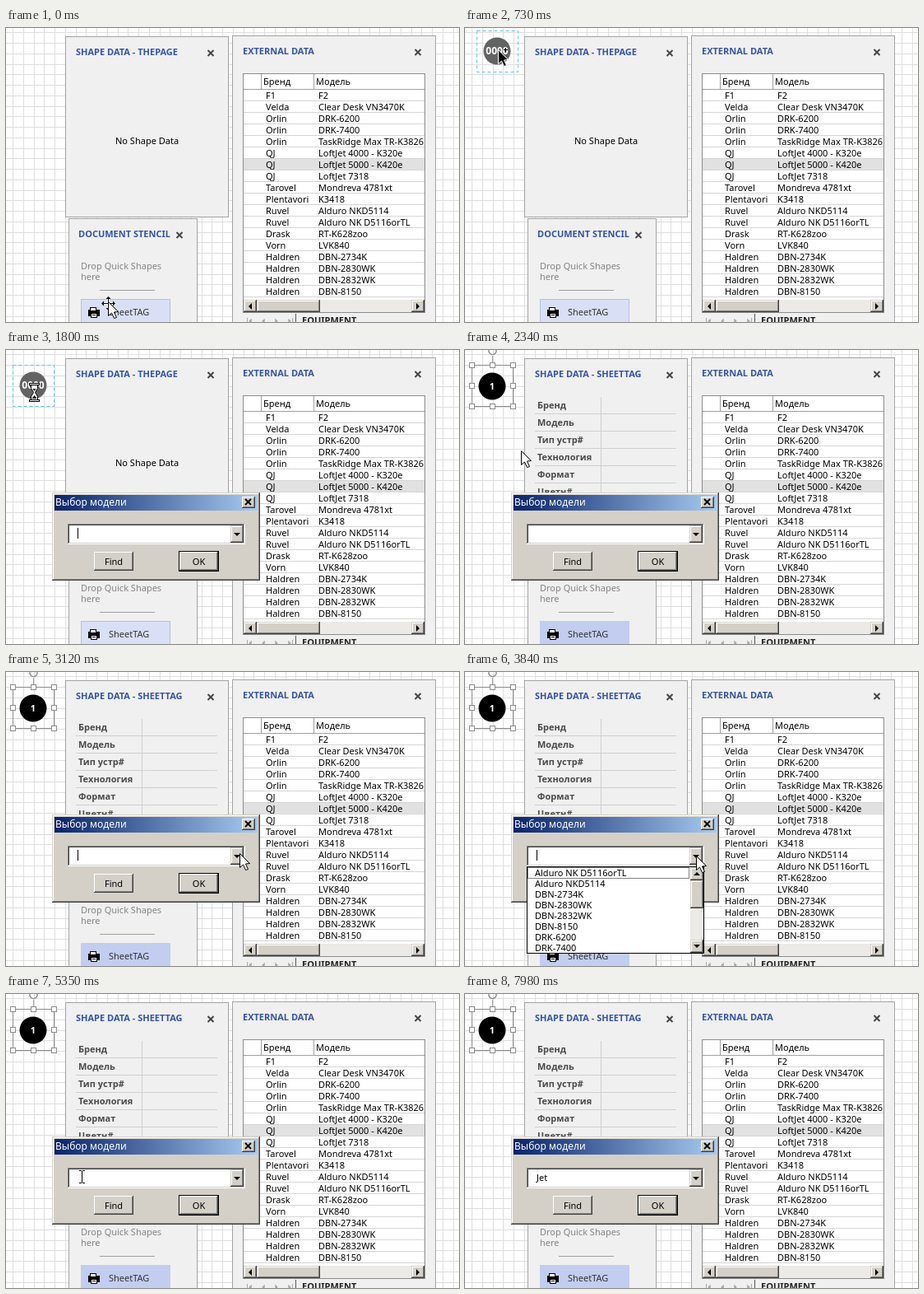
Recreate the animation shown at these times as an HTML page with a canvas. Size 551x357 px, loop 8000 ms.

```html
<!DOCTYPE html>
<html lang="ru">
<head>
<meta charset="utf-8">
<title>Выбор модели</title>
<style>
html, body { margin: 0; width: 100%; height: 100%; overflow: hidden; background: #fff; }
canvas { display: block; width: 551px; height: 357px; }
</style>
</head>
<body>
<canvas id="stage" width="551" height="357"></canvas>
<script>
const ctx = document.getElementById('stage').getContext('2d');
const LOOP = 8000;
const CELL = 12.75;
const FACE = '#d4d0c8';
const BLUE = '#3453a8';

const devices = [
  ['F1', 'F2'], ['Velda', 'Clear Desk VN3470K'], ['Orlin', 'DRK-6200'], ['Orlin', 'DRK-7400'],
  ['Orlin', 'TaskRidge Max TR-K3826'], ['QJ', 'LoftJet 4000 - K320e'], ['QJ', 'LoftJet 5000 - K420e'],
  ['QJ', 'LoftJet 7318'], ['Tarovel', 'Mondreva 4781xt'], ['Plentavori', 'K3418'],
  ['Ruvel', 'Alduro NKD5114'], ['Ruvel', 'Alduro NK D5116orTL'], ['Drask', 'RT-K628zoo'],
  ['Vorn', 'LVK840'], ['Haldren', 'DBN-2734K'], ['Haldren', 'DBN-2830WK'],
  ['Haldren', 'DBN-2832WK'], ['Haldren', 'DBN-8150']
];
const choices = [11, 10, 14, 15, 16, 17, 2, 3].map(i => devices[i][1]);
const fields = ['Бренд', 'Модель', 'Тип устр#', 'Технология', 'Формат', 'Цветн#'];

// [time, kind, x, y]
const pointer = [
  [0, 'move', 124, 334], [150, 'drag', 123, 332], [460, 'drag', 120, 272], [590, 'drag', 92, 128],
  [720, 'drag', 40, 26], [850, 'drag', 46, 26], [1130, 'drag', 40, 41], [1410, 'drag', 34, 41],
  [1800, 'wait', 34, 51], [2070, 'arrow', 40, 110], [2340, 'arrow', 68, 122], [2460, 'arrow', 122, 146],
  [2580, 'arrow', 180, 174], [2700, 'arrow', 232, 198], [2850, 'arrow', 268, 214], [2970, 'arrow', 284, 220],
  [3540, 'arrow', 283, 222], [3690, 'arrow', 281, 223], [3960, 'beam', 246, 222], [4080, 'beam', 174, 222],
  [4230, 'beam', 104, 222], [4380, 'arrow', 67, 222], [4650, 'arrow', 70, 221], [4790, 'beam', 84, 222],
  [4920, 'beam', 92, 222], [6440, 'none', 0, 0]
];
// [time, text, caret visible]
const edits = [
  [1800, '', 1], [2340, '', 0], [2850, '', 1], [3390, '', 0], [3840, '', 1], [5350, '', 0], [5820, '', 1],
  [6440, 'J', 1], [6830, 'J', 0], [7390, 'Je', 1], [7550, 'Jet', 1], [7980, 'Jet', 0]
];

const at = (keys, t) => keys.filter(k => k[0] <= t).pop();

function rect(x, y, w, h, fill) {
  ctx.fillStyle = fill;
  ctx.fillRect(x, y, w, h);
}

function frame(x, y, w, h, color) {
  ctx.strokeStyle = color;
  ctx.lineWidth = 1;
  ctx.strokeRect(x + .5, y + .5, w - 1, h - 1);
}

function text(s, x, mid, color = '#000', weight = 400, size = 11, align = 'left') {
  ctx.font = `${weight} ${size}px "Noto Sans", "Open Sans", sans-serif`;
  ctx.textAlign = align;
  ctx.fillStyle = color;
  ctx.fillText(s, x, mid + 4);
}

function poly(points, fill, stroke) {
  ctx.beginPath();
  points.forEach(([x, y]) => ctx.lineTo(x, y));
  ctx.closePath();
  if (fill) { ctx.fillStyle = fill; ctx.fill(); }
  if (stroke) { ctx.strokeStyle = stroke; ctx.lineWidth = 1; ctx.stroke(); }
}

function disc(x, y, r, fill) {
  ctx.beginPath();
  ctx.arc(x, y, r, 0, 7);
  ctx.fillStyle = fill;
  ctx.fill();
}

function cross(x, y, r, color, width) {
  ctx.beginPath();
  ctx.moveTo(x - r, y - r); ctx.lineTo(x + r, y + r);
  ctx.moveTo(x + r, y - r); ctx.lineTo(x - r, y + r);
  ctx.strokeStyle = color;
  ctx.lineWidth = width;
  ctx.stroke();
}

// Triangle pointing along angle a
function arrowHead(x, y, r, a, color) {
  const c = Math.cos(a), s = Math.sin(a);
  poly([[r / 2, 0], [-r / 2, -r], [-r / 2, r]].map(([u, v]) => [x + u * c - v * s, y + u * s + v * c]), color);
}

// Buttons have the white edge outside, windows and scroll bars inside
function raised(x, y, w, h, outer = FACE, inner = '#fff') {
  rect(x, y, w, h, '#404040');
  rect(x, y, w - 1, h - 1, outer);
  rect(x + 1, y + 1, w - 2, h - 2, '#808080');
  rect(x + 1, y + 1, w - 3, h - 3, inner);
  rect(x + 2, y + 2, w - 4, h - 4, FACE);
}

function scrollButton(x, y, w, h, angle) {
  raised(x, y, w, h);
  if (angle !== undefined) arrowHead(x + 8, y + 8, 4, angle, '#000');
}

function grid() {
  rect(0, 0, 551, 357, '#fff');
  for (let x = 8; x < 551; x += CELL) rect(Math.round(x), 0, 1, 357, '#dedede');
  for (let y = 18 - CELL; y < 357; y += CELL) rect(0, Math.round(y), 551, 1, '#dedede');
}

function panel(x, y, w, h, title, tx, ty, cx) {
  rect(x, y, w, h, '#f0f0f0');
  frame(x, y, w, h, '#a3a3a3');
  text(title, tx, ty, BLUE, 700);
  cross(cx, ty + 1.5, 3.5, '#444', 2);
}

function shapeData(linked) {
  panel(72, 10, 199, 220, 'SHAPE DATA - ' + (linked ? 'SHEETTAG' : 'THEPAGE'), 85, 29, 249);
  if (!linked) return text('No Shape Data', 133, 137);
  rect(165, 57, 1, 120, '#cfcfcf');
  fields.forEach((name, i) => {
    text(name, 88, 67 + 21 * i, '#4a4a4a', 600);
    rect(85, 77 + 21 * i, 172, 1, '#cfcfcf');
  });
}

function stencil(linked) {
  panel(76, 231, 157, 130, 'DOCUMENT STENCIL', 88, 250, 211);
  text('Drop Quick Shapes', 91, 289, '#858585');
  text('here', 91, 302, '#858585');
  rect(114, 318, 67, 1, '#a0a0a0');
  rect(91, 329, 109, 40, linked ? '#c2cdf0' : '#d9e0f5');
  if (!linked) frame(91, 329, 109, 40, '#b4c1e2');
  rect(100, 342, 14, 8, '#000');
  rect(102, 339, 8, 5, '#000');
  rect(103, 340, 6, 3, '#fff');
  rect(103, 346, 8, 6, '#000');
  rect(104, 347, 6, 4, '#fff');
  rect(105, 348, 4, 1, '#000');
  text('SheetTAG', 125, 345, '#333');
}

function externalData() {
  panel(275, 9, 248, 360, 'EXTERNAL DATA', 288, 28, 501);
  rect(288, 55, 222, 291, '#fff');
  ctx.save();
  ctx.beginPath();
  ctx.rect(288, 55, 221, 275);
  ctx.clip();
  rect(288, 159, 222, 14, '#e1e1e1');
  text('Бренд', 313, 65);
  text('Модель', 377, 65);
  rect(288, 74, 222, 1, '#a0a0a0');
  for (const x of [310, 374]) rect(x, 56, 1, 18, '#a0a0a0');
  devices.forEach(([brand, model], i) => {
    rect(288, 88 + 14 * i, 222, 1, '#d6d6d6');
    text(brand, 316, 82 + 14 * i);
    text(model, 380, 82 + 14 * i);
  });
  ctx.restore();
  frame(288, 55, 222, 291, '#8c8c8c');
  rect(289, 330, 220, 15, '#eceae6');
  scrollButton(289, 330, 16, 15, Math.PI);
  scrollButton(305, 330, 77, 15);
  scrollButton(493, 330, 16, 15, 0);
  for (let i = 0; i < 4; i++) {
    const x = 297 + 16 * i;
    arrowHead(x, 356, 3.5, i < 2 ? Math.PI : 0, '#a8a8a8');
    if (i % 3 === 0) rect(i ? x + 3 : x - 4, 352, 1, 7, '#a8a8a8');
  }
  rect(352, 347, 1, 10, '#555');
  text('EQUIPMENT', 360, 355, '#222', 700);
}

function ghost(x, y) {
  ctx.setLineDash([4, 3]);
  frame(x, y, 51, 51, '#5fc6ea');
  ctx.setLineDash([]);
  disc(x + 25, y + 25, 16.5, '#636363');
  text('0000', x + 25, y + 25, '#fff', 700, 12, 'center');
}

function placedShape() {
  ctx.beginPath();
  ctx.moveTo(33.5, 7); ctx.lineTo(33.5, 18);
  ctx.strokeStyle = '#a0a0a0';
  ctx.lineWidth = 1;
  ctx.stroke();
  frame(8, 18, 51, 51, '#8c8c8c');
  disc(33, 44, 16.5, '#000');
  text('1', 33, 44, '#fff', 700, 11, 'center');
  for (const x of [8, 33, 58]) for (const y of [18, 43, 68]) {
    if (x === 33 && y === 43) continue;
    rect(x - 3, y - 3, 7, 7, '#fff');
    frame(x - 3, y - 3, 7, 7, '#8c8c8c');
  }
  ctx.beginPath();
  ctx.arc(33.5, 1, 4.5, -.4, 4.6);
  ctx.strokeStyle = '#8c8c8c';
  ctx.lineWidth = 1.5;
  ctx.stroke();
}

function button(label, x, y, w, h, chosen) {
  if (chosen) rect(x - 1, y - 1, w + 2, h + 2, '#000');
  raised(x, y, w, h, '#fff', FACE);
  text(label, x + w / 2, y + h / 2, '#000', 400, 11, 'center');
}

function dialog(t) {
  raised(56, 173, 253, 107);
  const shade = ctx.createLinearGradient(60, 0, 305, 0);
  shade.addColorStop(0, '#0a246a');
  shade.addColorStop(1, '#a6caf0');
  rect(59, 176, 247, 19, shade);
  text('Выбор модели', 60, 185, '#fff', 400, 12);
  raised(287, 178, 16, 14, '#fff', FACE);
  cross(294.5, 184.5, 3.5, '#000', 2);

  rect(75, 211, 216, 25, '#fff');
  rect(75, 211, 215, 24, '#808080');
  rect(76, 212, 214, 23, FACE);
  rect(76, 212, 213, 22, '#404040');
  rect(77, 213, 212, 21, '#fff');
  raised(273, 213, 16, 21);
  arrowHead(281, 224, 4, Math.PI / 2, '#000');

  const [, typed, caret] = at(edits, t);
  text(typed, 87, 223);
  if (caret) rect(87 + [0, 5, 11, 15][typed.length], 216, 1, 13, '#000');

  button('Find', 107, 245, 48, 23);
  button('OK', 211, 245, 47, 23, true);
  if (t >= 3270 && t < 4530) dropdown();
}

function dropdown() {
  rect(75, 236, 216, 106, '#fff');
  ctx.setLineDash([1, 1]);
  frame(76, 237, 197, 14, '#000');
  ctx.setLineDash([]);
  choices.forEach((name, i) => text(name, 85, 244 + 13 * i));
  rect(274, 237, 16, 104, '#eceae6');
  scrollButton(274, 237, 16, 16, -Math.PI / 2);
  scrollButton(274, 253, 16, 34);
  scrollButton(274, 325, 16, 16, Math.PI / 2);
  frame(75, 236, 216, 106, '#000');
}

function arrow(x, y, fill, edge) {
  poly([[0, 0], [0, 17], [4, 13.5], [7, 20], [10, 19], [7, 12.5], [12, 12]]
    .map(([u, v]) => [x + u + .5, y + v + .5]), fill, edge);
}

const cursors = {
  none() {},
  arrow(x, y) { arrow(x, y, '#fff', '#000'); },
  drag(x, y) {
    arrow(x, y, '#000', '#fff');
    rect(x + 7, y, 5, 1, '#000');
    rect(x + 9, y - 2, 1, 5, '#000');
  },
  move(x, y) {
    rect(x - 7, y - 1, 16, 3, '#fff');
    rect(x - 1, y - 7, 3, 16, '#fff');
    rect(x - 6, y, 13, 1, '#000');
    rect(x, y - 6, 1, 13, '#000');
    for (let i = 0; i < 4; i++) {
      const a = i * Math.PI / 2;
      arrowHead(x + .5 + 7 * Math.cos(a), y + .5 + 7 * Math.sin(a), 3, a, '#000');
    }
    arrow(x, y - 2, '#fff', '#000');
  },
  wait(x, y) {
    poly([[-4, -9], [4, -9], [4, -5], [1, 0], [4, 5], [4, 9], [-4, 9], [-4, 5], [-1, 0], [-4, -5]]
      .map(([u, v]) => [x + u + .5, y + v + .5]), '#fff', '#000');
    poly([[x - 1.5, y - 4], [x + 2.5, y - 4], [x + .5, y - 1]], '#000');
    poly([[x - 2.5, y + 8], [x + 3.5, y + 8], [x + .5, y + 4]], '#000');
    for (const v of [-11, 9]) {
      rect(x - 6, y + v, 13, 3, '#000');
      rect(x - 5, y + v + 1, 11, 1, '#fff');
    }
  },
  beam(x, y) {
    rect(x, y - 7, 1, 14, '#000');
    for (const v of [-8, 7]) {
      rect(x - 3, y + v, 3, 1, '#000');
      rect(x + 1, y + v, 3, 1, '#000');
    }
  }
};

function draw(t) {
  const linked = t >= 1920;
  const [, kind, x, y] = at(pointer, t);
  grid();
  if (linked) placedShape();
  else if (t >= 1410) ghost(8, 18);
  else if (t >= 720) ghost(x - 26, y - 23);
  shapeData(linked);
  stencil(linked);
  externalData();
  if (t >= 1800) dialog(t);
  cursors[kind](x, y);
}

const start = performance.now();
function tick() {
  draw((performance.now() - start) % LOOP);
  requestAnimationFrame(tick);
}
tick();
</script>
</body>
</html>
```
